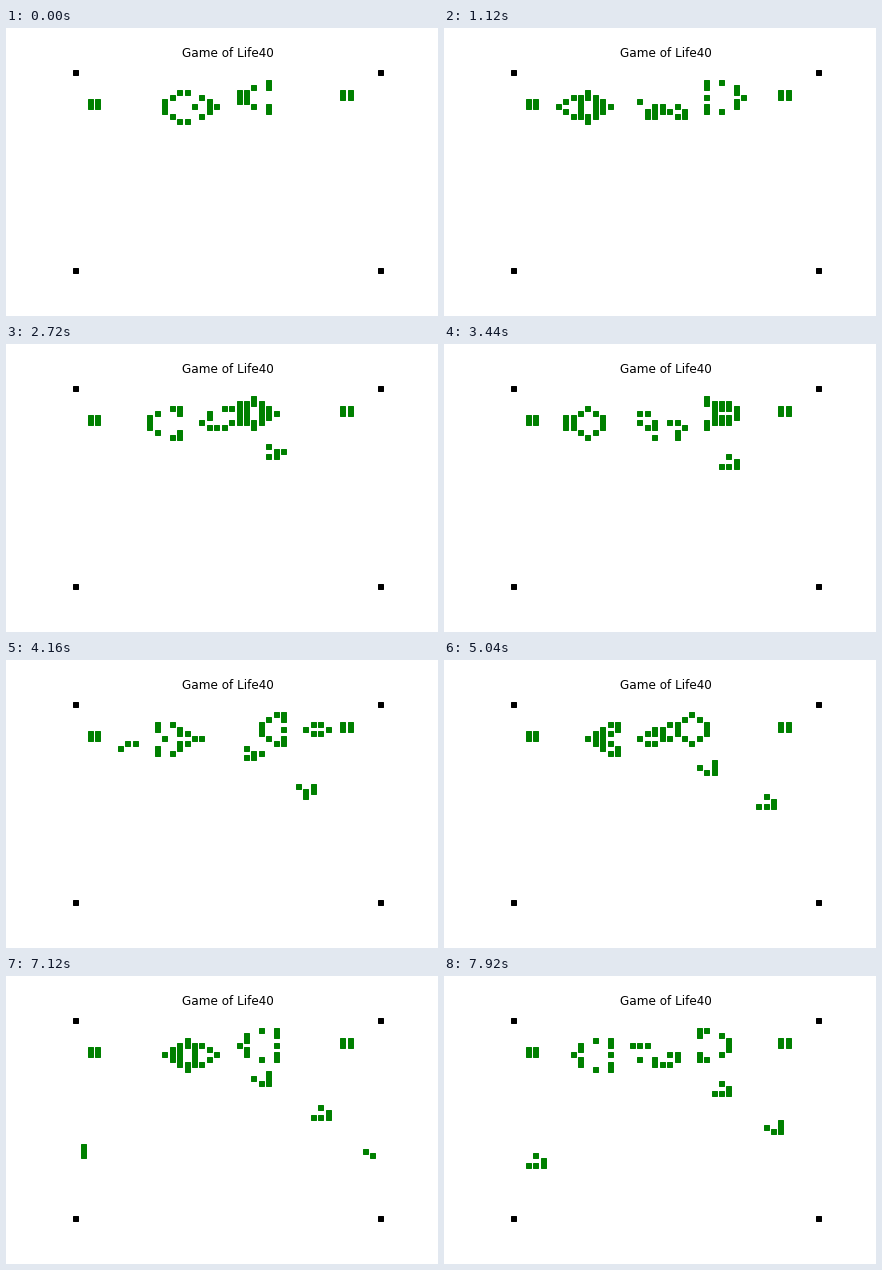
A matplotlib script for the animation above (8 s loop, 432x288 px).

```python
import matplotlib.pyplot as plt
import numpy as np
from matplotlib.animation import FuncAnimation

SIZE = 40
FRAMES = 100
INTERVAL = 80


def glider_gun():
    """Build the Gosper gun from two blocks, a ring and a mirrored shuttle."""
    y, x = np.mgrid[:SIZE, :SIZE] - 1

    def block(left, top):
        return (x // 2 == left // 2) & (y // 2 == top // 2)

    # Circle of radius 3, opened on the right, with a core and a tip
    ring = (np.rint(np.hypot(x - 13, y - 5)) == 3) & (x != 14)
    core_and_tip = (y == 5) & ((x == 14) | (x == 17))

    # The shuttle is symmetric about its middle row
    off = abs(y - 3)
    body = (x // 2 == 10) & (off <= 1)
    wings = (x == 22) & (off == 2)
    tails = (x == 24) & (off // 2 == 1)

    return block(0, 4) | block(34, 2) | ring | core_and_tip | body | wings | tails


def step(board):
    """Advance one generation on a board whose edges wrap around."""
    block_sum = sum(
        np.roll(board.astype(int), (dy, dx), axis=(0, 1))
        for dy in (-1, 0, 1) for dx in (-1, 0, 1)
    )
    return (block_sum == 3) | (board & (block_sum == 4))


generations = [glider_gun()]
while len(generations) < FRAMES:
    generations.append(step(generations[-1]))

fig, ax = plt.subplots(figsize=(6, 4), dpi=72, facecolor="white")
fig.subplots_adjust(left=0.125, right=0.9, bottom=0.125, top=0.88)
ax.set_title(f"Game of Life{SIZE}", fontsize=12, pad=6, family="DejaVu Sans")
ax.axis("off")

margin = 0.05 * (SIZE + 1)
ax.set_xlim(-1 - margin, SIZE + margin)
ax.set_ylim(SIZE + margin, -1 - margin)

style = dict(linestyle="none", marker="s", markersize=5, markeredgewidth=1)
ax.plot([-1, -1, SIZE, SIZE], [-1, SIZE, -1, SIZE], color="k", **style)
cells, = ax.plot([], [], color="g", **style)


def draw(frame):
    rows, cols = np.nonzero(generations[frame])
    cells.set_data(cols, rows)
    return cells,


animation = FuncAnimation(fig, draw, frames=FRAMES, interval=INTERVAL,
                          repeat=True, repeat_delay=0)
plt.show()
```
